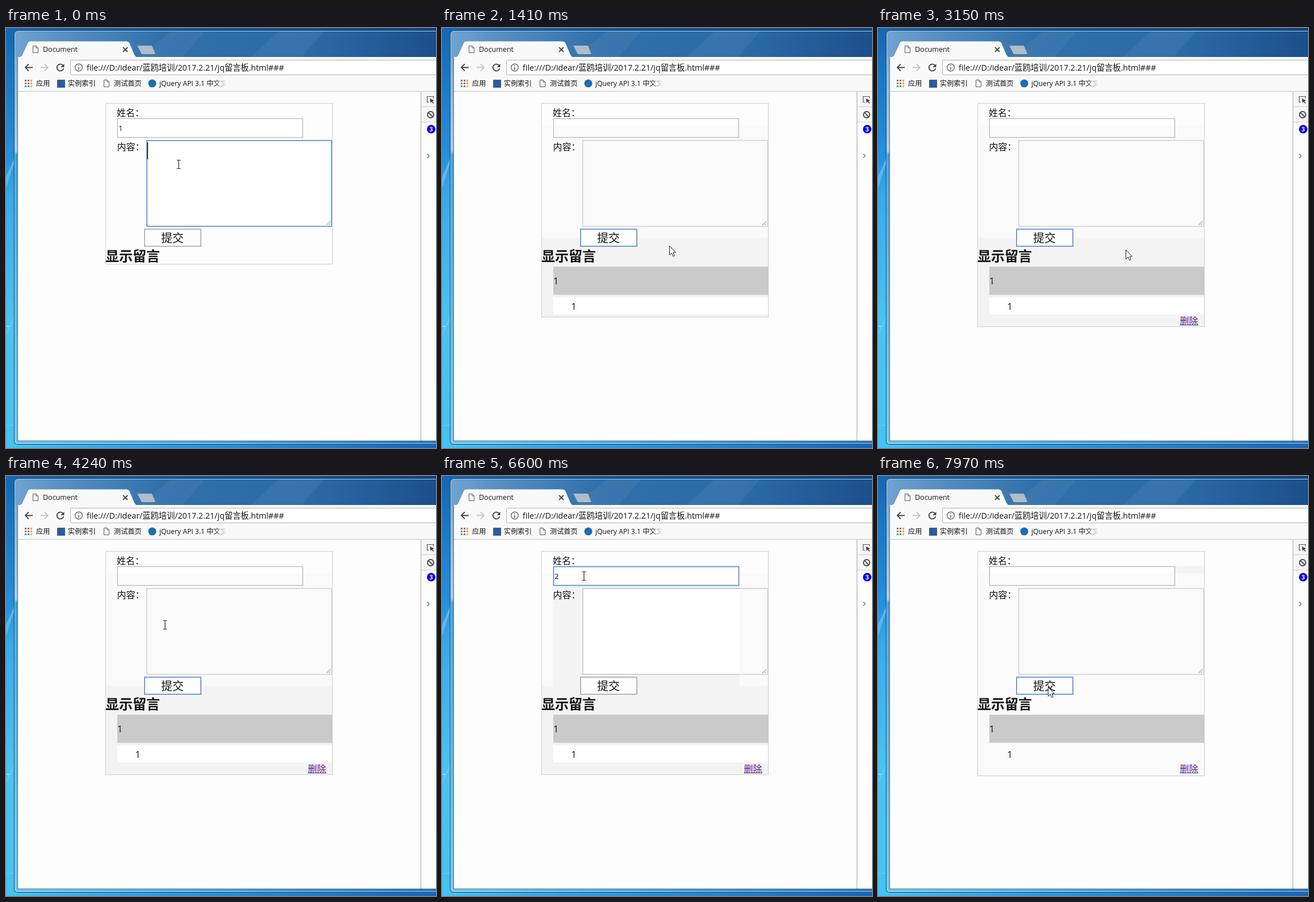
Animation, 757 px wide and 739 px high, one loop 8000 ms. Source, as an HTML page:

```html
<!DOCTYPE html>
<html lang="zh-CN">
<head>
<meta charset="utf-8">
<title>Message board</title>
<style>
  html, body { margin: 0; width: 100%; height: 100%; overflow: hidden; background: #2a7fd0; }
  svg { position: absolute; left: 0; top: 0; display: block; }
  text { font-family: "Open Sans", "Noto Sans CJK SC", "Noto Sans CJK", "Noto Sans", sans-serif; fill: #111; white-space: pre; }
  .label { font-size: 16px; }
  .mark { font-size: 12.2px; }
  .line { fill: none; stroke: #444; stroke-width: 1.8; }
</style>
</head>
<body>
<svg width="757" height="739" viewBox="0 0 757 739">
  <defs>
    <linearGradient id="sky" x2="0" y2="1">
      <stop offset="0" stop-color="#1468b4"/><stop offset=".3" stop-color="#2590dc"/>
      <stop offset=".4" stop-color="#39a9e8"/><stop offset=".7" stop-color="#4cc2f1"/><stop offset="1" stop-color="#45c3f2"/>
    </linearGradient>
    <linearGradient id="top"><stop offset="0" stop-color="#1468b4"/><stop offset="1" stop-color="#0d4787"/></linearGradient>
    <linearGradient id="floor">
      <stop offset="0" stop-color="#45c3f2"/><stop offset=".35" stop-color="#2a9fe6"/><stop offset="1" stop-color="#1668bd"/>
    </linearGradient>
    <linearGradient id="glass">
      <stop offset="0" stop-color="#6fa3d0"/><stop offset=".1" stop-color="#5b90c2"/><stop offset=".35" stop-color="#2f70aa"/>
      <stop offset=".7" stop-color="#2b6aa6"/><stop offset="1" stop-color="#1b4f8c"/>
    </linearGradient>
    <linearGradient id="side" x2="0" y2="1">
      <stop offset="0" stop-color="#6fa3d0"/><stop offset=".29" stop-color="#a9cbe6"/><stop offset=".3" stop-color="#409fdf"/>
      <stop offset="1" stop-color="#6fcaf0"/>
    </linearGradient>
    <linearGradient id="base"><stop offset="0" stop-color="#6fcaf0"/><stop offset="1" stop-color="#3479bd"/></linearGradient>
    <linearGradient id="fade">
      <stop offset="0" stop-color="#f9f9f9" stop-opacity="0"/><stop offset=".75" stop-color="#f9f9f9"/>
    </linearGradient>
    <clipPath id="panelClip"><rect id="panelArea" x="175" y="132" width="400" height="284"/></clipPath>
    <path id="page" d="M.5.5H6L9.500 4V12.500H.5ZM6 .5V4H9.500" fill="#fff" stroke="#555"/>
  </defs>

  <!-- desktop -->
  <rect width="757" height="739" fill="url(#sky)"/>
  <rect width="757" height="6" fill="url(#top)"/>
  <rect y="731" width="757" height="8" fill="url(#floor)"/>
  <path d="M0 262L15 228V236L0 282Z" fill="#8ad4f6" opacity=".5"/>
  <path d="M0 540L15 508M0 700L15 698" stroke="#9fe0f8" opacity=".5"/>
  <path d="M1 525H6" stroke="#e4f7ff"/>

  <!-- window frame -->
  <path d="M770 4.500H22Q14.500 4.500 14.500 12V726Q14.500 732.500 21 732.500H770Z" fill="url(#side)" stroke="#17395a"/>
  <path d="M757 6H22Q16 6 16 12V52H757Z" fill="url(#glass)"/>
  <path d="M290 6H350L310 52H235ZM480 6H560L520 52H430Z" fill="#fff" opacity=".05"/>
  <rect x="21" y="726" width="736" height="6" fill="url(#base)"/>
  <path d="M770 5.500H22Q15.500 5.500 15.500 12V726Q15.500 731.500 21 731.500H770" fill="none" stroke="#c4e2f5" opacity=".8"/>
  <path d="M20.500 52V726.500H757" fill="none" stroke="#3f6d94"/>

  <!-- browser chrome -->
  <rect x="21" y="51" width="736" height="61" fill="#f9f9f9"/>
  <path d="M21 52C28 51 28 49 31 43L38 27Q39.500 23.500 43 23.500H212Q216 23.500 217.500 27L226 47Q228 51 232 52Z" fill="#f9f9f9"/>
  <path d="M231 31.500Q230 30.500 232 30.500H255Q257 30.500 258 32.500L263 44.500Q263.500 46.500 261 46.500H241Q238.500 46.500 237.500 44.500Z" fill="#aebccb" stroke="#4d7194"/>
  <use href="#page" x="47" y="31"/>
  <text x="65" y="42" font-size="12.500">Document</text>
  <path d="M206 34L214 42M214 34L206 42" class="line" stroke-width="1.500"/>
  <path d="M47 69.500H34.500M40 63.500L34 69.500L40 75.500" class="line"/>
  <path d="M61 69.500H73.500M68 63.500L74 69.500L68 75.500" class="line" style="stroke:#c6c6c6"/>
  <path d="M100.500 66A6 6 0 1 0 101.500 71" class="line"/><path d="M102.500 63V69H96.500Z" fill="#444"/>
  <rect x="113.500" y="56.500" width="660" height="26" rx="2" fill="#fff" stroke="#b0b0b0"/>
  <circle cx="128" cy="69.500" r="6.300" fill="none" stroke="#555" stroke-width="1.300"/>
  <path d="M128 69V73.500M128 65.500V67.200" stroke="#555" stroke-width="1.600"/>
  <text x="142" y="74.500" font-size="14.250">file:///D:/idear/蓝鸥培训/2017.2.21/jq留言板.html###</text>
  <g id="apps"></g>
  <text x="53" y="102" class="mark">应用</text>
  <rect x="90" y="91" width="14" height="14" fill="#2f5a9c"/>
  <text x="109" y="102" class="mark">实例索引</text>
  <use href="#page" x="172" y="91"/>
  <text x="190" y="102" class="mark">测试首页</text>
  <circle cx="257.500" cy="97.500" r="7" fill="#1b6cb0"/>
  <text x="270" y="102" class="mark">jQuery API 3.1 中文文</text>
  <rect x="366" y="88" width="30" height="20" fill="url(#fade)"/>

  <!-- page and tools -->
  <rect x="21" y="112" width="736" height="614" fill="#fdfdfd"/>
  <path d="M21 111.500H757" stroke="#c3c3c3"/>
  <rect x="731" y="112" width="26" height="53" fill="#f6f6f6"/>
  <path d="M730.500 112V726" stroke="#a6a6a6"/>
  <path d="M731 138.500H757M731 165.500H757" stroke="#ccc"/>
  <path d="M745 130.500H741.500V120.500H752.500V124" fill="none" stroke="#555" stroke-width="1.200"/>
  <path d="M746 124L754 127.500L750.700 128.700L753.500 132L752 133L749.300 129.700L747.500 132Z" fill="#444"/>
  <circle cx="747.500" cy="152.500" r="5.500" class="line"/><path d="M743.700 148.700L751.300 156.300" class="line"/>
  <circle cx="748.500" cy="178" r="7.500" fill="#0505e6"/>
  <text x="748.500" y="182" font-size="11" font-weight="700" text-anchor="middle" style="fill:#fff">3</text>
  <path d="M741.500 221.500L745 225L741.500 228.500" fill="none" stroke="#3a80e0" stroke-width="1.500"/>

  <!-- message board -->
  <g clip-path="url(#panelClip)">
    <rect x="175" y="132" width="400" height="400" fill="#fdfdfd"/>
    <rect id="tintUpper" x="176" y="171" width="398" height="357" fill="#fafafa"/>
    <rect id="tintLower" x="176" y="369" width="398" height="158" fill="#f3f3f3"/>
    <rect id="tintName" x="195" y="158" width="329" height="227" fill="#f3f3f3"/>
    <rect id="tintBody" x="195" y="158" width="379" height="192" fill="#f3f3f3"/>
    <rect id="tintAll" x="176" y="171" width="398" height="357" fill="#fafafa"/>
    <g id="entry">
      <rect x="196" y="420" width="378" height="49.500" fill="#cacaca"/>
      <text x="196" y="451" class="label">1</text>
      <rect id="entryBody" x="196" y="474" width="378" height="30"/>
      <text x="227.500" y="495.500" class="label">1</text>
    </g>
    <g id="remove">
      <text x="531.500" y="521" class="label" style="fill:#551a8b">删除</text>
      <path d="M531.500 522.500H564" stroke="#551a8b"/>
    </g>
  </g>
  <rect id="border" x="175.500" y="132.500" width="399" height="283" fill="none" stroke="#ccc"/>
  <text x="195" y="155" class="label">姓名：</text>
  <text x="195.500" y="215" class="label">内容：</text>
  <text x="175" y="410" font-size="24" font-weight="700">显示留言</text>
  <rect id="nameBox" x="196.500" y="159.500" width="326" height="33" fill="#fff"/>
  <rect id="bodyBox" x="248" y="198" width="325" height="151" fill="#fff"/>
  <rect id="bodyEdge" x="524" y="199" width="48.500" height="149.500" fill="#fafafa"/>
  <g id="dull" fill="#fafafa">
    <rect x="197" y="171" width="325" height="21"/><rect x="248.500" y="198.500" width="324" height="150"/>
  </g>
  <path d="M564 347L571 340M568 347L571 344" stroke="#777"/>
  <rect id="button" x="244" y="354" width="99" height="30" fill="#fdfdfd"/>
  <text x="273" y="377" font-size="20">提交</text>
  <text id="nameText" x="198" y="181" font-size="13.300"></text>
  <text id="bodyText" x="250" y="225" font-size="24"></text>
  <rect id="nameCaret" y="169" width="1" height="15" fill="#111"/>
  <rect id="bodyCaret" y="201" width="1.500" height="30" fill="#111"/>

  <g id="pointer">
    <path id="arrow" d="M.5.5V16.500L4.300 13L6.800 18.700L9.300 17.700L6.900 12H11.500Z" fill="#fff" stroke="#1c1c28"/>
    <path id="beam" d="M-3.500-7.500H-1Q0-7.500 0-6Q0-7.500 1-7.500H3.500M0-6.500V6.500M-3.500 7.500H-1Q0 7.500 0 6Q0 7.500 1 7.500H3.500" fill="none" stroke="#222" stroke-width="1.200"/>
  </g>
</svg>
<script>
const $ = id => document.getElementById(id);
const set = (id, attrs) => { for (const k in attrs) $(id).setAttribute(k, attrs[k]); };
const show = (id, on) => set(id, { visibility: on ? 'visible' : 'hidden' });
const LOOP = 8000, ADDED = 1170, NAMED = 5340, BODY = 7000, AGAIN = 7970;

const pointer = [
  [0, 'beam', 304, 240], [150, 'beam', 306, 250], [270, 'beam', 310, 298], [390, 'beam', 313, 340],
  [510, 'arrow', 314, 374], [660, 'arrow', 310, 375], [780, 'arrow', 301, 369],
  [1290, 'arrow', 345, 375], [1410, 'arrow', 400, 383], [1530, 'arrow', 430, 389], [1650, 'arrow', 441, 391],
  [2440, 'arrow', 440, 391], [2570, 'arrow', 439, 391], [3150, 'arrow', 436, 390], [3270, 'arrow', 432, 389],
  [3420, 'arrow', 385, 381], [3550, 'arrow', 331, 373], [3700, 'arrow', 321, 371],
  [3850, 'beam', 303, 345], [3970, 'beam', 287, 315], [4120, 'beam', 280, 254], [4240, 'beam', 280, 262],
  [4390, 'beam', 292, 310], [4520, 'arrow', 310, 370], [4790, 'beam', 283, 285], [4920, 'arrow', 253, 196],
  [5070, 'beam', 251, 190], [5220, 'beam', 246, 178], [5340, 'beam', 242, 170], [6170, 'none', 242, 170],
  [6600, 'beam', 250, 176], [6730, 'beam', 281, 268], [6880, 'beam', 281, 245], [7000, 'beam', 280, 227],
  [7270, 'beam', 281, 253], [7430, 'beam', 290, 314], [7580, 'beam', 296, 338], [7700, 'arrow', 299, 371]
];
// [time, y of the panel's lower edge]
const edge = [[0, 415], [1170, 420], [1290, 460], [1410, 508], [1800, 516], [1920, 524], [2070, 525], [7970, 527]];
const at = (steps, t) => steps.findLast(s => s[0] <= t);

const dots = ['#e04a3c', '#e04a3c', '#f0a020', '#3ba55a', '#3f7de0', '#f0a020', '#3ba55a', '#3f7de0', '#f0b020'];
$('apps').innerHTML = dots.map((c, i) =>
  `<rect x="${33 + i % 3 * 5}" y="${91 + (i / 3 | 0) * 5}" width="3" height="3" fill="${c}"/>`).join('');

function draw(t) {
  const within = (a, b = LOOP) => t >= a && t < b;
  const [, kind, x, y] = at(pointer, t);
  set('pointer', { transform: `translate(${x} ${y})` });
  show('arrow', kind === 'arrow');
  show('beam', kind === 'beam');

  const bottom = at(edge, t)[1];
  set('panelArea', { height: bottom - 131 });
  set('border', { height: bottom - 132 });
  show('entry', t >= ADDED);
  show('remove', t >= 1800);
  set('entryBody', { fill: t < AGAIN ? '#fff' : '#fafafa' });

  show('tintUpper', t >= ADDED);
  show('tintLower', within(1290, AGAIN));
  show('tintName', within(NAMED, AGAIN));
  show('tintBody', t >= BODY);
  show('tintAll', t >= AGAIN);
  show('dull', within(ADDED, NAMED) || t >= AGAIN);
  show('bodyEdge', within(NAMED, BODY));

  const focus = t < 1050 ? 'bodyBox' : t < NAMED ? 'button' : t < BODY ? 'nameBox' : t < 7850 ? 'bodyBox' : 'button';
  for (const id of ['nameBox', 'bodyBox', 'button']) {
    const on = focus === id;
    set(id, { stroke: on ? '#5b8fd6' : id === 'button' ? '#777' : '#a9a9a9', 'stroke-width': on ? 1.7 : 1 });
  }

  $('nameText').textContent = t < ADDED ? '1' : within(6050, AGAIN) ? '2' : '';
  $('bodyText').textContent = within(150, ADDED) ? '1' : within(7270, AGAIN) ? '2' : '';
  set('nameCaret', { x: t < 6050 ? 198 : 206 });
  show('nameCaret', within(NAMED, 5900) || within(6050, 6600));
  set('bodyCaret', { x: within(150, ADDED) || t >= 7270 ? 264 : 248.5 });
  show('bodyCaret', t < 660 || within(BODY, 7850));
}

function tick() {
  draw(performance.now() % LOOP);
  requestAnimationFrame(tick);
}
tick();
</script>
</body>
</html>
```
